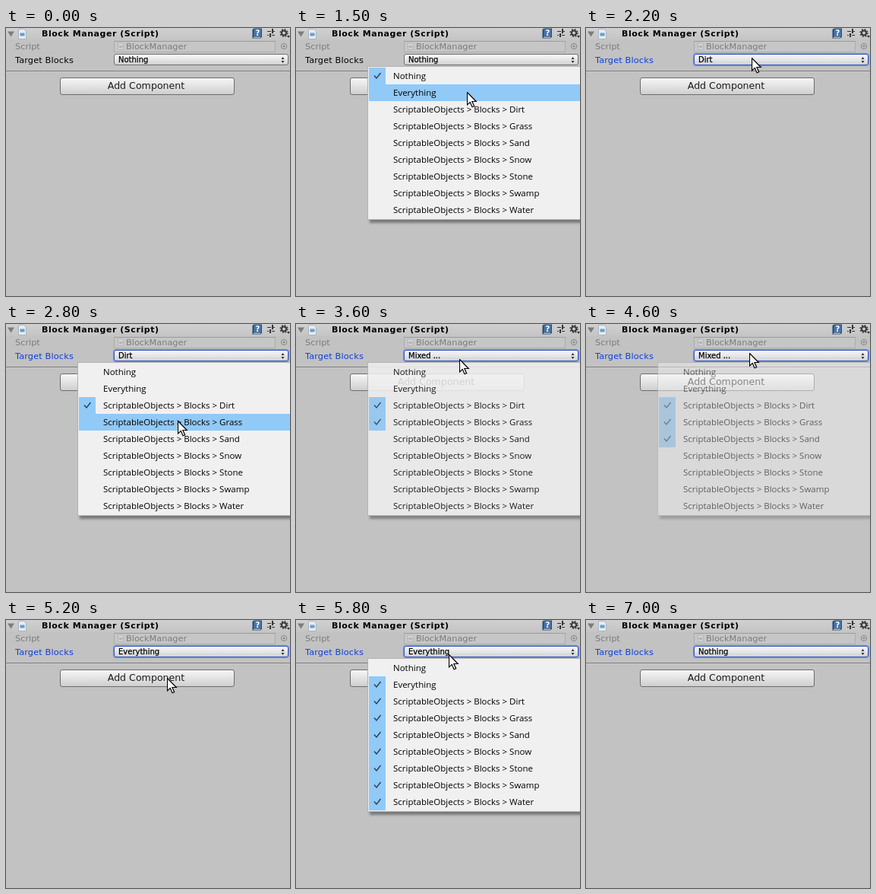
Write an HTML page that moves like this. It is 374 px wide and 352 px high and loops after 7100 ms.

```html
<!DOCTYPE html>
<html lang="en">
<head>
<meta charset="utf-8">
<title>Block Manager inspector</title>
<style>
  html, body { margin: 0; width: 100%; height: 100%; overflow: hidden; }
  body { position: relative; background: #c2c2c2; color: #000; font: 11.3px/16px "DejaVu Sans", sans-serif; }
  body * { box-sizing: border-box; }
  .abs, .text, .menu, .row, svg { position: absolute; }
  .text { white-space: pre; height: 16px; }
  .dim { color: #7b7b7b; }
  .header { left: 0; top: 0; width: 100%; height: 16px; background: linear-gradient(#d0d0d0, #c4c4c4); }
  .title { left: 47px; top: 0; font-weight: bold; font-size: 11px; letter-spacing: .55px; }
  .field { left: 142px; top: 17px; width: 213px; height: 15px; border: 1px solid #adadad; border-top-color: #9c9c9c; background: #c6c6c6; }
  .popup { left: 142px; top: 34px; width: 230px; height: 15px; border: 1px solid #707070; border-radius: 3px;
    background: linear-gradient(#fafafa, #d2d2d2); padding-left: 5px; font-size: 10px; line-height: 14px; white-space: pre;
    -webkit-text-stroke: .25px #000; }
  .line { left: 0; top: 56px; width: 100%; height: 2px; background: linear-gradient(#7c7c7c 50%, #cacaca 50%); }
  .button { left: 71px; top: 65px; width: 230px; height: 23px; border: 1px solid #6c6c6c; border-radius: 3px;
    background: linear-gradient(#f6f6f6, #cfcfcf); color: #1c1c1c; font-size: 12.6px; line-height: 20px;
    text-align: center; padding-right: 3px; }
  .focus #label { color: #0d3fdc; }
  .focus .popup { border-color: #2f57cf; box-shadow: 0 0 1px 1px rgba(70, 105, 220, .6); }
  .menu { left: 94px; top: 50px; width: 300px; height: 202px; border: 1px solid #b2b2b2; background: #f0f0f0;
    box-shadow: 3px 4px 3px rgba(0, 0, 0, .38); font: 11.5px/22px "Open Sans", "Noto Sans", sans-serif; }
  .row { left: 1px; width: 298px; height: 22px; padding-left: 32px; white-space: pre; }
  .row.hover { background: #91c9f7; }
  .row svg { left: 0; top: 0; width: 22px; height: 22px; background: #91c9f7; visibility: hidden; }
  .row.checked svg { visibility: inherit; }
  #icons, #cursor { left: 0; top: 0; }
</style>
</head>
<body>
  <div class="abs header"></div>
  <div class="text title">Block Manager (Script)</div>
  <div class="text dim" style="left:12px;top:17px">Script</div>
  <div class="abs field"></div>
  <div class="text dim" style="left:158px;top:17px">BlockManager</div>
  <div class="text" id="label" style="left:12px;top:35px;letter-spacing:.15px">Target Blocks</div>
  <div class="abs popup" id="popup"></div>
  <div class="abs line"></div>
  <div class="abs button">Add Component</div>

  <svg id="icons" width="374" height="60">
    <path d="M2 4.500h9l-4.500 7z" fill="#7c7c7c"/>
    <path d="M16.500 1.500h7l3 3v10h-10z" fill="#e6ecf2" stroke="#a9b4be"/>
    <rect x="18.500" y="6.500" width="6" height="4" fill="#6d9bcb"/>
    <path d="M147.500 19.500h5l2 2v7h-7z" fill="#d2d2d2" stroke="#b5b5b5"/>
    <rect x="149" y="23" width="4" height="3" fill="#a9b9c8"/>
    <circle cx="366" cy="24" r="3.600" fill="none" stroke="#858585"/>
    <circle cx="366" cy="24" r="1.300" fill="#858585"/>
    <path d="M324.500 2l2-1.500h10.500v11l-2 2h-10.500z" fill="#2d4a70"/>
    <path d="M326.500 1.500h9.500v9.500h-9.500z" fill="#4a75a8"/>
    <path d="M326 12.200h9" stroke="#dfe7ee"/>
    <text x="331.300" y="10" font-size="10" font-weight="bold" text-anchor="middle" fill="#fff">?</text>
    <g fill="#333">
      <path d="M344 4h5v1h-5zM350 1h2v6h-2zM352 4h2v1h-2z"/>
      <path d="M344 9h2v1h-2zM347 7h2v5h-2zM350 9h4v1h-4z"/>
    </g>
    <g fill="none" stroke="#3a3a3a">
      <circle cx="366" cy="6.500" r="3" stroke-width="2"/>
      <circle cx="366" cy="6.500" r="4.700" stroke-width="1.800" stroke-dasharray="1.850 1.850"/>
    </g>
    <path d="M370 10h4l-2 3z" fill="#333"/>
    <path d="M362.500 41l2-3 2 3zM362.500 43h4l-2 3z" fill="#333"/>
  </svg>

  <div class="menu" id="menu"></div>

  <svg id="cursor" width="14" height="22">
    <path d="M.5.5v16.500l3.800-3.600 2.800 6.400 2.600-1.100-2.800-6.200h5.400z" fill="#fff" stroke="#000" stroke-width="1.200"/>
  </svg>

<script>
const LOOP = 7100, STEP = 100, ALL = 127;
const blocks = ["Dirt", "Grass", "Sand", "Snow", "Stone", "Swamp", "Water"];

// Each visit to the menu: opening time, fade-in length, click time, chosen row.
const visits = [
  { open: 1050, fade: 50, click: 1800, row: 2 },
  { open: 2350, fade: 200, click: 2900, row: 3 },
  { open: 3410, fade: 220, click: 4100, row: 4 },
  { open: 4490, fade: 220, click: 5100, row: 1 },
  { open: 5550, fade: 200, click: 6300, row: 0 }
];

// Pointer path: time, x, y.
const path = [
  [400, 341, 162], [900, 222, 40], [1200, 222, 40], [1500, 225, 84],
  [1700, 230, 105], [1800, 230, 105], [2200, 218, 39], [2400, 218, 39],
  [2700, 226, 127], [2900, 226, 127], [3300, 215, 41], [3600, 215, 46],
  [3900, 226, 149], [4100, 226, 149], [4500, 215, 38], [4600, 215, 38],
  [4900, 214, 83], [5100, 214, 83], [5500, 201, 41], [5800, 201, 45],
  [6000, 204, 61], [6300, 204, 61], [6700, 380, 110]
];

const $ = id => document.getElementById(id);
const menu = $("menu"), popup = $("popup"), cursor = $("cursor");

const rows = ["Nothing", "Everything", ...blocks.map(b => `ScriptableObjects > Blocks > ${b}`)]
  .map((name, i) => {
    const row = document.createElement("div");
    row.className = "row";
    row.style.top = 1 + i * 22 + "px";
    row.innerHTML = '<svg><path d="M7 10.500l3 3.500 5.500-7" fill="none" stroke="#243f56" stroke-width="1.400"/></svg>';
    row.append(name);
    menu.append(row);
    return row;
  });

const pick = (mask, row) => row === 0 ? 0 : row === 1 ? ALL : mask ^ (1 << (row - 2));

function caption(mask) {
  if (!mask) return "Nothing";
  if (mask === ALL) return "Everything";
  return mask & (mask - 1) ? "Mixed ..." : blocks[Math.log2(mask)];
}

function isChecked(mask, row) {
  if (row < 2) return mask === (row ? ALL : 0);
  return Boolean(mask & (1 << (row - 2)));
}

function pointer(t) {
  const i = path.findIndex(p => p[0] > t);
  if (i < 1) return null;
  const [t0, x0, y0] = path[i - 1], [t1, x1, y1] = path[i];
  const k = (t - t0) / (t1 - t0), e = k * k * (3 - 2 * k);
  return [Math.round(x0 + (x1 - x0) * e), Math.round(y0 + (y1 - y0) * e)];
}

function render(t) {
  const done = visits.filter(v => t >= v.click);
  const mask = done.reduce((m, v) => pick(m, v.row), 0);
  const visit = visits.find(v => t >= v.open && t < v.click);
  const pos = pointer(t);

  document.body.classList.toggle("focus", done.length > 0);
  popup.textContent = caption(mask);

  menu.style.visibility = visit ? "visible" : "hidden";
  if (visit) {
    menu.style.opacity = Math.min(1, (t - visit.open) / visit.fade);
    const hover = pos ? Math.floor((pos[1] - 52) / 22) : -1;
    rows.forEach((row, i) => {
      row.classList.toggle("checked", isChecked(mask, i));
      row.classList.toggle("hover", i === hover);
    });
  }

  cursor.style.visibility = pos ? "visible" : "hidden";
  if (pos) cursor.style.transform = `translate(${pos[0]}px, ${pos[1]}px)`;
}

function tick() {
  const t = performance.now() % LOOP;
  render(Math.floor(t / STEP) * STEP);
  requestAnimationFrame(tick);
}
tick();
</script>
</body>
</html>
```
